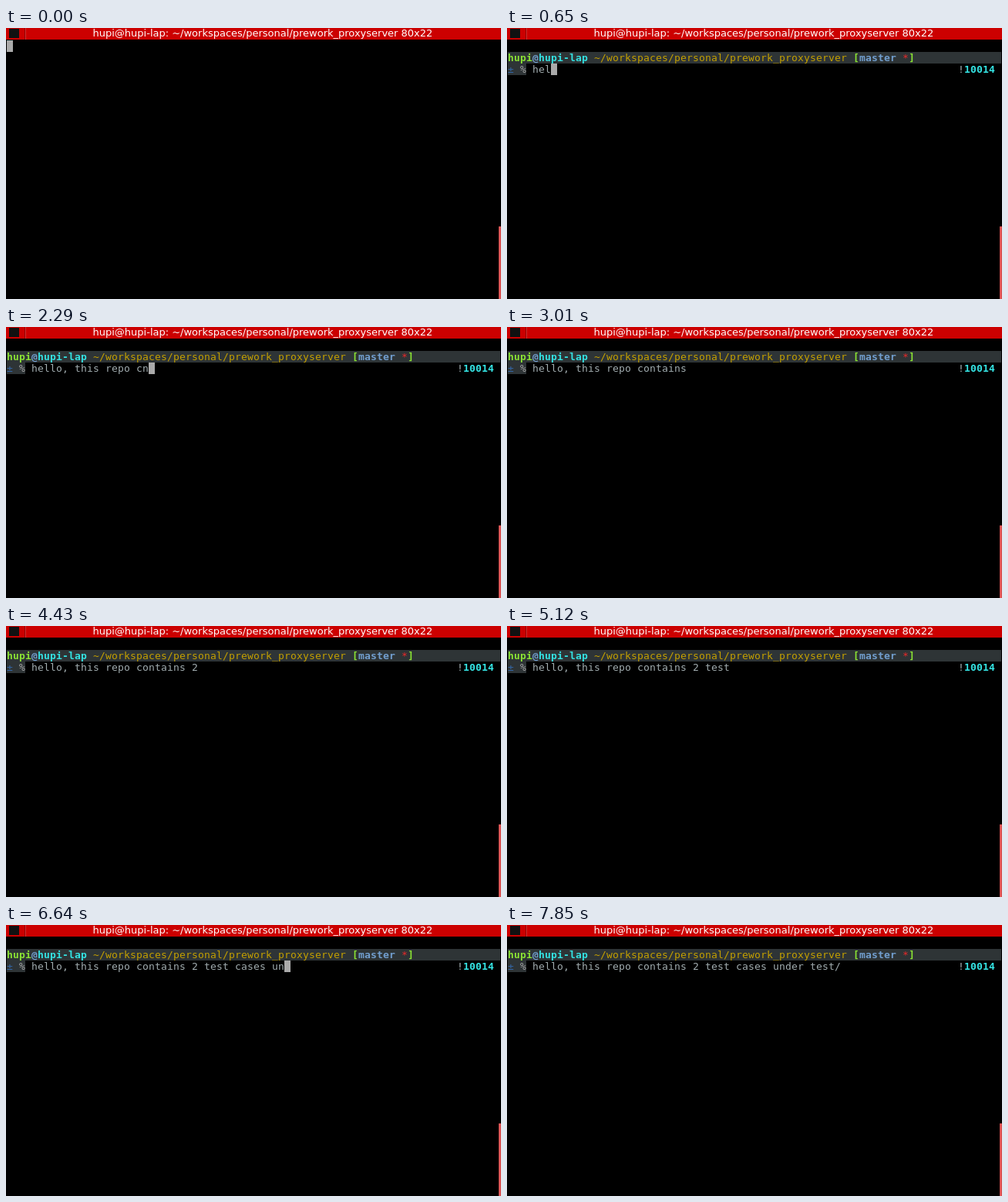
Write an HTML page with a canvas that moves like this. It is 642x351 px and loops after 8 s.

```html
<!DOCTYPE html>
<html lang="en">
<head>
<meta charset="utf-8">
<style>
html, body { margin: 0; height: 100%; overflow: hidden; background: #000; }
canvas { display: block; }
</style>
</head>
<body>
<canvas id="stage" width="642" height="351"></canvas>
<script>
const ctx = document.getElementById('stage').getContext('2d');
const LOOP = 8000, CELL_W = 8, CELL_H = 15, LEFT = 1, TOP = 16;
const MONO = '13px "DejaVu Sans Mono", monospace';
const SANS = '13px "DejaVu Sans", sans-serif';
const GREY = '#a2adb0', GREEN = '#8ae234', CYAN = '#34e2e2', BLUE = '#729fcf';
const USER = 'hupi', HOST = 'hupi-lap';
const PATH = '~/workspaces/personal/prework_proxyserver';

// Bursts of typing: key times, then the keys ("<" is backspace)
const bursts = [
  [[530, 590, 650, 740, 840, 940], 'hello,'],
  [[1020, 1100], ' t'],
  [[1260, 1300, 1350], 'his'],
  [[1430], ' '],
  [[1510, 1570, 1640, 1740, 1800, 1860, 1910, 1970], 'repo cno'],
  [[2290, 2370, 2440, 2510, 2580, 2650, 2730], '<<ontai'],
  [[2950, 3010, 3100], 'ns '],
  [[4430, 4570], '2 '],
  [[4710, 4760, 4810, 5120], 'test'],
  [[5420, 5510], ' x'],
  [[5770, 5805, 5840, 5960], '<cas'],
  [[6190, 6230], 'es'],
  [[6450, 6520, 6590, 6660, 6730, 6800], ' under'],
  [[6900, 6950, 7020, 7090, 7150, 7220], ' test/']
];
const cursorOn = [[0, 840], [1800, 2730], [5420, 6800]];

function rect(x, y, w, h, color) {
  ctx.fillStyle = color;
  ctx.fillRect(x, y, w, h);
}

function cells(col, row, count, color) {
  rect(LEFT + col * CELL_W, TOP + row * CELL_H, count * CELL_W, CELL_H, color);
}

function print(col, row, text, color, bold) {
  ctx.font = (bold ? 'bold ' : '') + MONO;
  ctx.fillStyle = color;
  for (const ch of text) {
    ctx.fillText(ch, LEFT + col++ * CELL_W, TOP + row * CELL_H + 12);
  }
  return col;
}

function typedAt(t) {
  let text = '';
  for (const [times, keys] of bursts) {
    times.forEach((time, i) => {
      if (time <= t) text = keys[i] === '<' ? text.slice(0, -1) : text + keys[i];
    });
  }
  return text;
}

function drawWindow() {
  rect(0, 0, 642, 351, '#000');
  rect(0, 0, 642, 15, '#cc0000');
  rect(4, 1, 13, 12, '#111');
  rect(24, 0, 1, 15, '#8f0000');
  rect(25, 0, 1, 15, '#d83030');
  rect(639, 257, 3, 94, '#dc5555');
  ctx.font = SANS;
  ctx.fillStyle = '#fff';
  ctx.fillText(`${USER}@${HOST}: ${PATH} 80x22`, 112.5, 11);
}

function drawPrompt() {
  cells(0, 1, 80, '#2e3436');
  cells(0, 2, 3, '#2e3436');
  let col = print(0, 1, USER, GREEN, true);
  col = print(col, 1, '@', BLUE, true);
  col = print(col, 1, HOST, CYAN, true);
  col = print(col + 1, 1, PATH, '#c4a000');
  col = print(col + 1, 1, '[', GREEN, true);
  col = print(col, 1, 'master', BLUE, true);
  col = print(col + 1, 1, '*', '#ef2929');
  print(col, 1, ']', GREEN, true);
  print(0, 2, '±', '#3465a4');
  print(2, 2, '%', '#aaaaaa');
  print(73, 2, '!', GREY);
  print(74, 2, '10014', CYAN, true);
}

function draw(t) {
  drawWindow();
  if (t < 20) {
    cells(0, 0, 1, '#aaaaaa');
    return;
  }
  drawPrompt();
  const end = print(4, 2, typedAt(t), GREY);
  if (cursorOn.some(([from, to]) => t >= from && t < to)) cells(end, 2, 1, '#aaaaaa');
}

const start = performance.now();
function tick() {
  draw((performance.now() - start) % LOOP);
  requestAnimationFrame(tick);
}
tick();
</script>
</body>
</html>
```
